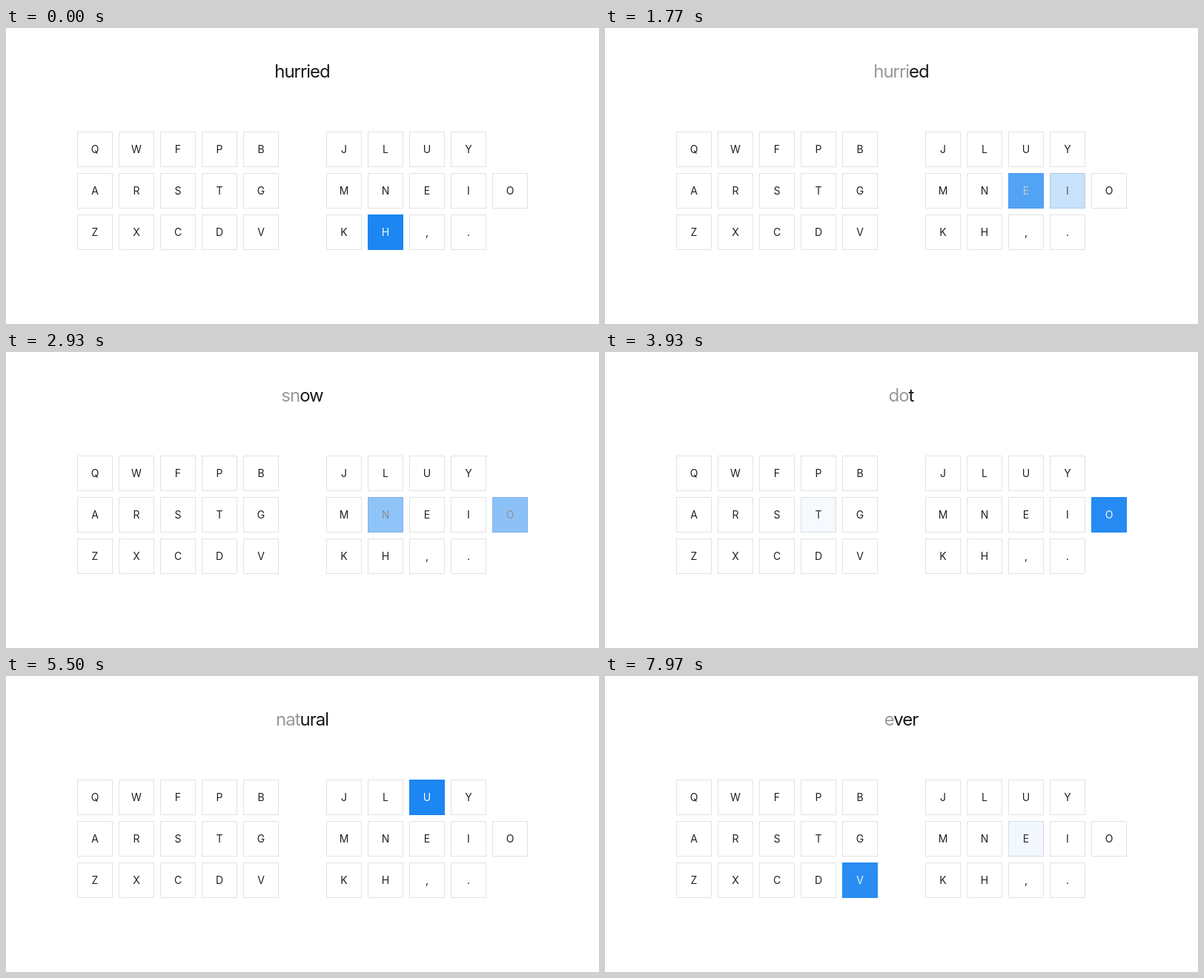
These frames come from a looping animation (800x400 px, 8000 ms). An HTML page:

```html
<!DOCTYPE html>
<html lang="en">
<head>
<meta charset="utf-8">
<title>Typing practice</title>
<style>
  html, body { margin: 0; width: 100%; height: 100%; overflow: hidden; background: #fff; }
  svg { display: block; width: 800px; height: 400px; font-family: Inter, sans-serif; }
  text { text-anchor: middle; }
  .key { font-size: 14px; }
  .word { font-size: 24px; letter-spacing: -1px; }
</style>
</head>
<body>
<svg id="stage" viewBox="0 0 800 400"><text class="word" x="399.5" y="67"><tspan id="done" fill="#999"></tspan><tspan id="rest" fill="#171717"></tspan></text></svg>
<script>
const LOOP = 8000, FADE = 100, FPS = 30;
const WHITE = [255, 255, 255], BLUE = [28, 134, 242], INK = [32, 32, 32], LINE = [226, 226, 226];

// Each word with the moments its letters are typed
const words = [
  ["hurried", [1190, 1325, 1595, 1618, 1718, 1875, 1963]],
  ["snow", [2765, 2898, 2980, 3065]],
  ["dot", [3828, 3921, 4431]],
  ["natural", [5110, 5275, 5395, 6572, 6910, 7018, 7220]],
  ["ever", [7896]]
];

const rows = [["QWFPB", "JLUY"], ["ARSTG", "MNEIO"], ["ZXCDV", "KH,."]];
const stage = document.getElementById("stage");
const done = document.getElementById("done");
const rest = document.getElementById("rest");
const keys = {};

function add(tag, attrs) {
  const el = document.createElementNS("http://www.w3.org/2000/svg", tag);
  for (const name in attrs) el.setAttribute(name, attrs[name]);
  return stage.appendChild(el);
}

rows.forEach((halves, r) => halves.forEach((half, h) => [...half].forEach((ch, c) => {
  const x = (h ? 432 : 96) + c * 56, y = 140 + r * 56;
  const box = add("rect", { x: x + 0.5, y: y + 0.5, width: 47, height: 47 });
  const label = add("text", { class: "key", x: x + 24, y: y + 29 });
  label.textContent = ch;
  keys[ch] = { box, label, spans: [] };
})));

// A key is lit from the previous keystroke until its own
let last = -Infinity;
for (const [word, times] of words) {
  word.split("").forEach((ch, i) => {
    if (i > times.length) return;
    const end = i < times.length ? times[i] : Infinity;
    keys[ch.toUpperCase()].spans.push([last, end]);
    last = end;
  });
}

// cubic-bezier(.4, 0, .2, 1)
function ease(x) {
  if (x <= 0) return 0;
  if (x >= 1) return 1;
  let lo = 0, hi = 1, s = 0.5;
  for (let i = 0; i < 20; i++) {
    s = (lo + hi) / 2;
    const u = 1 - s;
    if (1.2 * s * u * u + 0.6 * s * s * u + s * s * s < x) lo = s; else hi = s;
  }
  return s * s * (3 - 2 * s);
}

const mix = (a, b, p) => `rgb(${a.map((v, i) => Math.round(v + (b[i] - v) * p))})`;
const fade = (t, start) => ease((t - start) / FADE);

function drawWord(t) {
  const [word, times] = words.find(([w, ts]) => ts.length < w.length || t < ts[ts.length - 1]);
  const typed = times.filter(v => v <= t).length;
  done.textContent = word.slice(0, typed);
  rest.textContent = word.slice(typed);
}

function draw(ms) {
  const t = Math.floor((ms + 4) * FPS / 1000) * 1000 / FPS;
  drawWord(t);
  for (const { box, label, spans } of Object.values(keys)) {
    const p = spans.reduce((sum, [a, b]) => sum + fade(t, a) - fade(t, b), 0);
    box.setAttribute("fill", mix(WHITE, BLUE, p));
    box.setAttribute("stroke", mix(LINE, BLUE, p));
    label.setAttribute("fill", mix(INK, WHITE, p));
  }
}

function tick() {
  draw(performance.now() % LOOP);
  requestAnimationFrame(tick);
}
tick();
</script>
</body>
</html>
```
